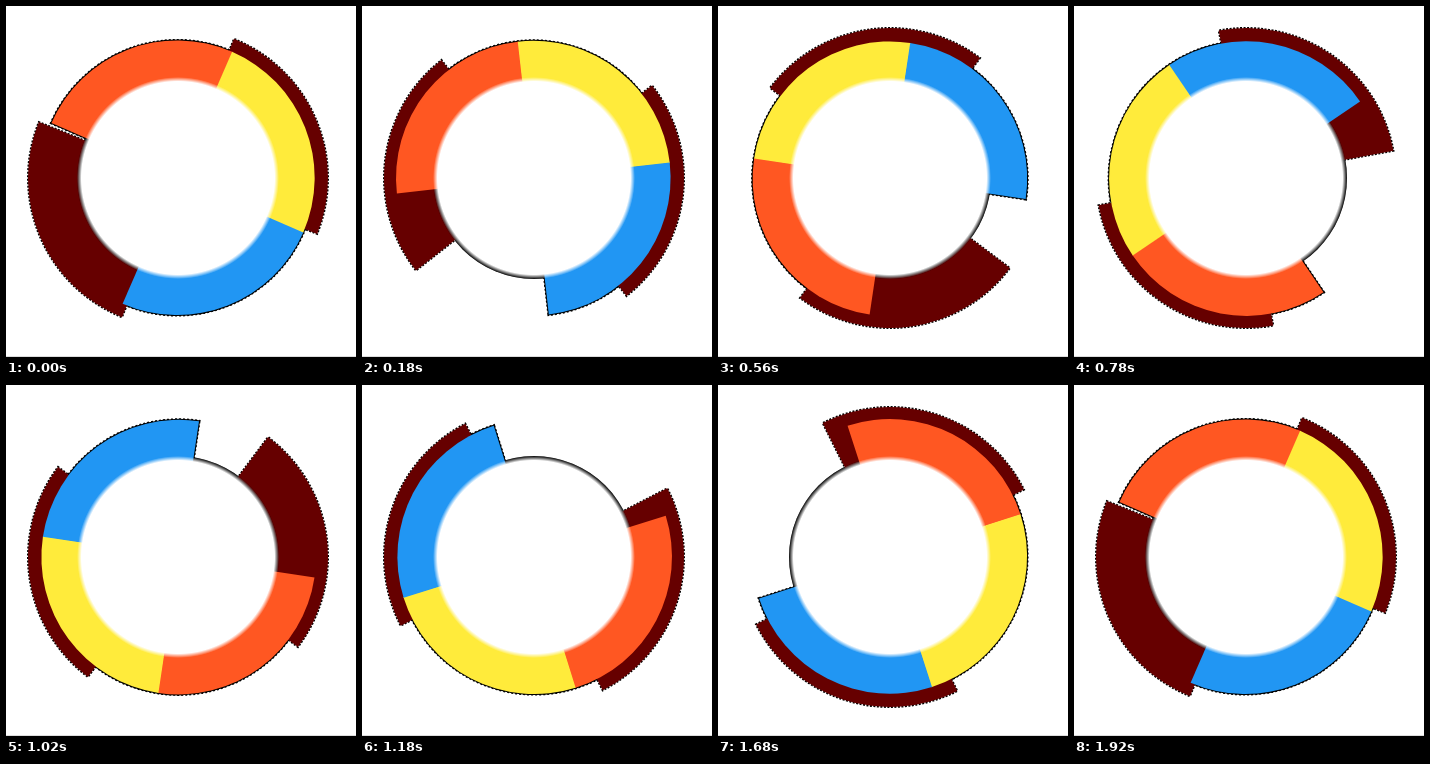
An HTML page with a canvas for the animation above (1960 ms loop, 350 by 351 pixels).

```html
<!DOCTYPE html>
<html>
<head>
<meta charset="utf-8">
<style>
  html, body { margin: 0; width: 100%; height: 100%; overflow: hidden; background: #fff; }
  canvas { display: block; }
</style>
</head>
<body>
<canvas id="stage" width="350" height="351"></canvas>
<script>
const ctx = document.getElementById('stage').getContext('2d');
const LOOP = 1960, C = 172, INNER = 101, RING = 137.3, BACK = 150;
const WOBBLE = 0.7; // the coloured ring turns slightly off centre

// [step, degrees turned]: the spin is slightly uneven
const KNOTS = [[0, 0], [7, 30], [23, 105], [42, 195], [55, 251], [68, 311.4], [78, 360]];

// Ticks of 20 ms; about every fifth one holds the pose
function stepAt(ms) {
  const tick = Math.floor(ms / 20);
  return tick - Math.floor((tick + 3) / 5) + (tick >= 27 ? 1 : 0);
}

function turnAt(step) {
  const i = Math.max(1, KNOTS.findIndex(k => k[0] >= step));
  const [s0, a0] = KNOTS[i - 1], [s1, a1] = KNOTS[i];
  return a0 + (a1 - a0) * (step - s0) / (s1 - s0);
}

const rad = deg => deg * Math.PI / 180;

// Draws around the stage centre, turned clockwise and shifted sideways
function turned(deg, shift, paint) {
  ctx.save();
  ctx.translate(C, C);
  ctx.rotate(rad(deg));
  ctx.translate(shift, 0);
  paint();
  ctx.restore();
}

// Angles run clockwise from the top
function wedge(from, sweep, r) {
  ctx.beginPath();
  ctx.moveTo(0, 0);
  ctx.arc(0, 0, r, rad(from - 90), rad(from + sweep - 90));
  ctx.closePath();
}

function fillWedge(from, sweep, r, color) {
  wedge(from, sweep, r);
  ctx.fillStyle = color;
  ctx.fill();
}

function outline(from, sweep, r, width, dash) {
  wedge(from, sweep, r);
  ctx.lineWidth = width;
  ctx.setLineDash(dash);
  ctx.stroke();
}

function disc(r, fill) {
  ctx.beginPath();
  ctx.arc(C, C, r, 0, 7);
  ctx.fillStyle = fill;
  ctx.fill();
}

function fade(r0, r1, rgb) {
  const g = ctx.createRadialGradient(C, C, r0, C, C, r1);
  g.addColorStop(0, `rgba(${rgb},1)`);
  g.addColorStop(1, `rgba(${rgb},0)`);
  return g;
}
const shade = fade(98, 101.5, '0,0,0'), glow = fade(96.5, 101, '255,255,255');

function draw(ms) {
  const turn = turnAt(stepAt(ms));
  const front = 23.5 - turn, back = 21.9 + turn;

  ctx.fillStyle = '#fff';
  ctx.fillRect(0, 0, 350, 351);
  ctx.fillStyle = '#ddd';
  ctx.fillRect(0, 350, 350, 1);

  turned(front, -WOBBLE, () => {
    outline(-90, 270, RING, 2, []);
    outline(-90, 270, RING, 3, [2, 2]);
  });
  turned(back, 0, () => {
    outline(0, 90, BACK, 2, [2, 1.5]);
    outline(180, 90, BACK, 2, [2, 1.5]);
  });

  // Dark rim of the hole, also hides the outlines near the centre
  disc(INNER, '#000');
  turned(back, 0, () => {
    fillWedge(0, 90, BACK, '#600');
    fillWedge(180, 90, BACK, '#600');
  });
  disc(101.5, shade);

  // Small overlaps avoid seams between neighbouring colours
  turned(front, -WOBBLE, () => {
    fillWedge(-90, 90.3, RING, '#ff5722');
    fillWedge(0, 90.3, RING, '#ffeb3b');
    fillWedge(90, 90, RING, '#2196f3');
  });
  disc(INNER, glow);
}

const start = performance.now();
function frame() {
  draw((performance.now() - start) % LOOP);
  requestAnimationFrame(frame);
}
frame();
</script>
</body>
</html>
```
